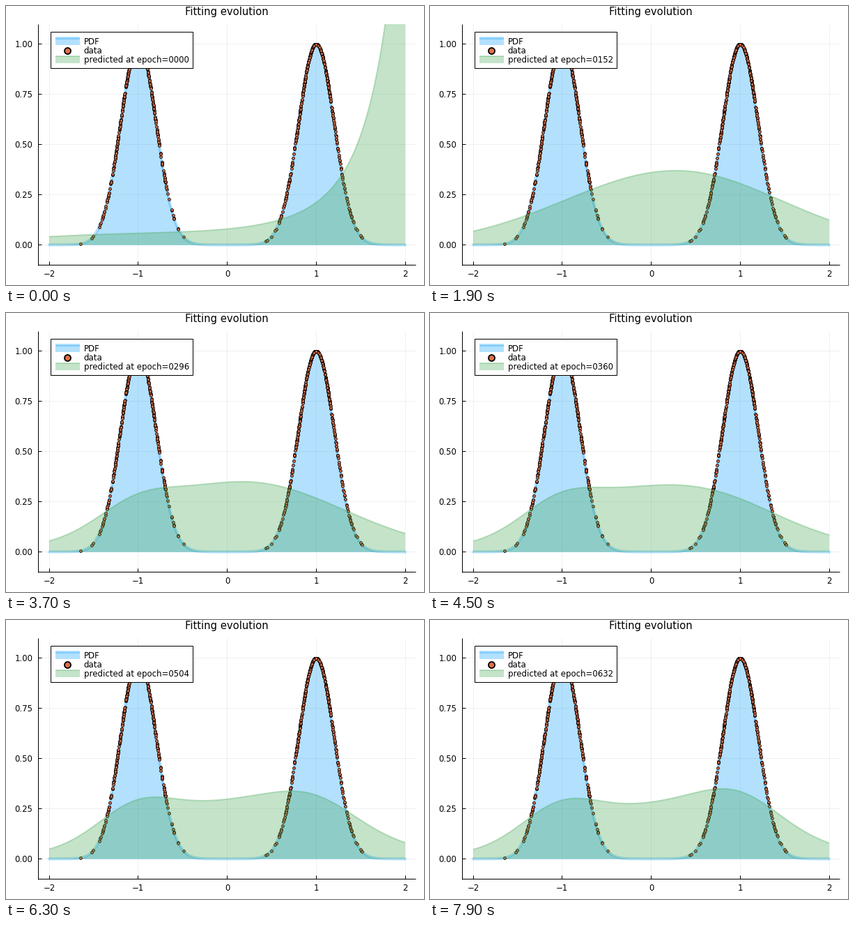
These frames come from a looping animation (600 px wide and 400 px high, 8 s). A matplotlib script:

```python
import numpy as np
import matplotlib.pyplot as plt
from matplotlib.animation import FuncAnimation
from matplotlib.patches import Rectangle

W, H, DPI = 600, 400, 100
PT = 72 / DPI  # points per pixel
FRAMES, INTERVAL, EPOCH_STEP = 80, 100, 8
BLUE, ORANGE, GREEN = "#009afa", "#e36f47", "#3da44d"
LEFT, RIGHT, TOP, BOTTOM = 46, 588, 26, 371
GRID = np.linspace(-2, 2, 401)


def px(x):
    return 317.5 + 127.75 * np.asarray(x)


def py(y):
    return 342.5 - 288 * np.asarray(y)


def bell(x, mean, width):
    return np.exp(-.5 * ((x - mean) / width) ** 2)


def true_pdf(x):
    return bell(x, -1, .2) + bell(x, 1, .2)


def ramp(epoch, start, end):
    """Smooth step from 0 at start to 1 at end."""
    t = np.clip((epoch - start) / (end - start), 0, 1)
    return t * t * (3 - 2 * t)


def predicted(x, epoch):
    """One lopsided hump that grows a left bump, then a right one."""
    drift, back = ramp(epoch, 32, 152), ramp(epoch, 152, 232)
    mean = .1 + .18 * drift - .08 * back
    left_width = 1.32 - .08 * drift - .14 * back
    right_width = 1.165 - .08 * ramp(epoch, 152, 360)
    height = .37 - .1 * ramp(epoch, 152, 632)
    left = .148 * (1 - np.exp(-max(epoch - 152, 0) / 130))
    right = .13 * ramp(epoch, 300, 600)
    hump = (height * bell(x, mean, np.where(x < mean, left_width, right_width))
            + left * bell(x, -1.04, .42) + right * bell(x, 1, .45))
    # The untrained curve fades out in log space
    untrained = -2.53 + .531 * x + .33 * x ** 2 + .115 * x ** 3
    fade = (1 - min(epoch / 32, 1)) ** 1.5
    return np.exp(fade * untrained + (1 - fade) * np.log(hump))


plt.rcParams["font.family"] = "DejaVu Sans"
fig = plt.figure(figsize=(W / DPI, H / DPI), dpi=DPI, facecolor="white")
ax = fig.add_axes([0, 0, 1, 1])
ax.set_xlim(0, W)
ax.set_ylim(H, 0)
ax.axis("off")


def line(xs, ys, color="black", width=1, cap="butt", **kw):
    return ax.plot(xs, ys, color=color, lw=width * PT,
                   solid_capstyle=cap, **kw)[0]


def label(x, y, text, size=11.6, **kw):
    return ax.text(x, y, text, fontsize=size * PT, va="baseline", **kw)


def box(x0, y0, x1, y1, **kw):
    return ax.add_patch(Rectangle((x0, y0), x1 - x0, y1 - y0, **kw))


def dots(xs, ys, size, edge, z):
    ax.plot(xs, ys, "o", ms=size * PT, mfc=ORANGE, mec="black",
            mew=edge * PT, zorder=z)


# Grid, ticks and axes
for v in range(-2, 3):
    x = px(v) - .5
    line([x, x], [TOP, BOTTOM], alpha=.06, zorder=0)
    line([x, x], [BOTTOM - 5, BOTTOM], zorder=1)
    label(px(v), 387.5, str(v).replace("-", "\u2212"), ha="center")
for v in np.arange(0, 1.01, .25):
    y = py(v) - .5
    line([LEFT, RIGHT], [y, y], alpha=.06, zorder=0)
    line([LEFT, LEFT + 5], [y, y], zorder=1)
    label(38.3, py(v) + 4.3, f"{v:.2f}", ha="right")
line([LEFT, LEFT], [TOP, BOTTOM + 1], zorder=1)
line([LEFT, RIGHT], [BOTTOM, BOTTOM], zorder=1)
label(317.2, 13, "Fitting evolution", size=14.8, ha="center")

# Density and data
pdf = py(true_pdf(GRID))
ax.fill_between(px(GRID), pdf, py(0), color=BLUE, alpha=.3, lw=0, zorder=2)
line(px(GRID), pdf, BLUE, 4, "round", alpha=.3, zorder=3)
rng = np.random.default_rng(7)
data = np.concatenate([rng.normal(m, .2, 450) for m in (-1, 1)])
dots(px(data), py(true_pdf(data)), 3.8, .8, 4)

# Prediction
clip = Rectangle((LEFT, TOP), RIGHT - LEFT, BOTTOM - TOP, transform=ax.transData)
area = ax.fill(px(GRID), py(GRID), color=GREEN, alpha=.3, lw=0, zorder=5)[0]
edge = line(px(GRID), py(GRID), GREEN, 2, alpha=.3, zorder=6)
for part in (area, edge):
    part.set_clip_path(clip)

# Legend
box(64, 37, 268, 89, fc="white", ec="black", lw=PT, zorder=7)
for y, color, width in ((46, BLUE, 4), (72, GREEN, 2)):
    box(71, y, 106, y + 10, fc=color, alpha=.3, lw=0, zorder=8)
    line([71, 106], [y, y], color, width, alpha=.3, zorder=9)
dots([88.3], [63.6], 9, 1.8, 9)
names = [label(111.5, 54.8 + 13 * i, text, size=11.8, zorder=9)
         for i, text in enumerate(("PDF", "data", ""))]
caption = names[-1]


def update(i):
    epoch = i * EPOCH_STEP
    ys = py(predicted(GRID, epoch))
    edge.set_data(px(GRID), ys)
    outline = np.column_stack([px(GRID), ys])
    area.set_xy(np.vstack([outline, [px(2), py(0)], [px(-2), py(0)]]))
    caption.set_text(f"predicted at epoch={epoch:04d}")
    return area, edge, caption


anim = FuncAnimation(fig, update, frames=FRAMES, interval=INTERVAL,
                     repeat=True, repeat_delay=0)
plt.show()
```
